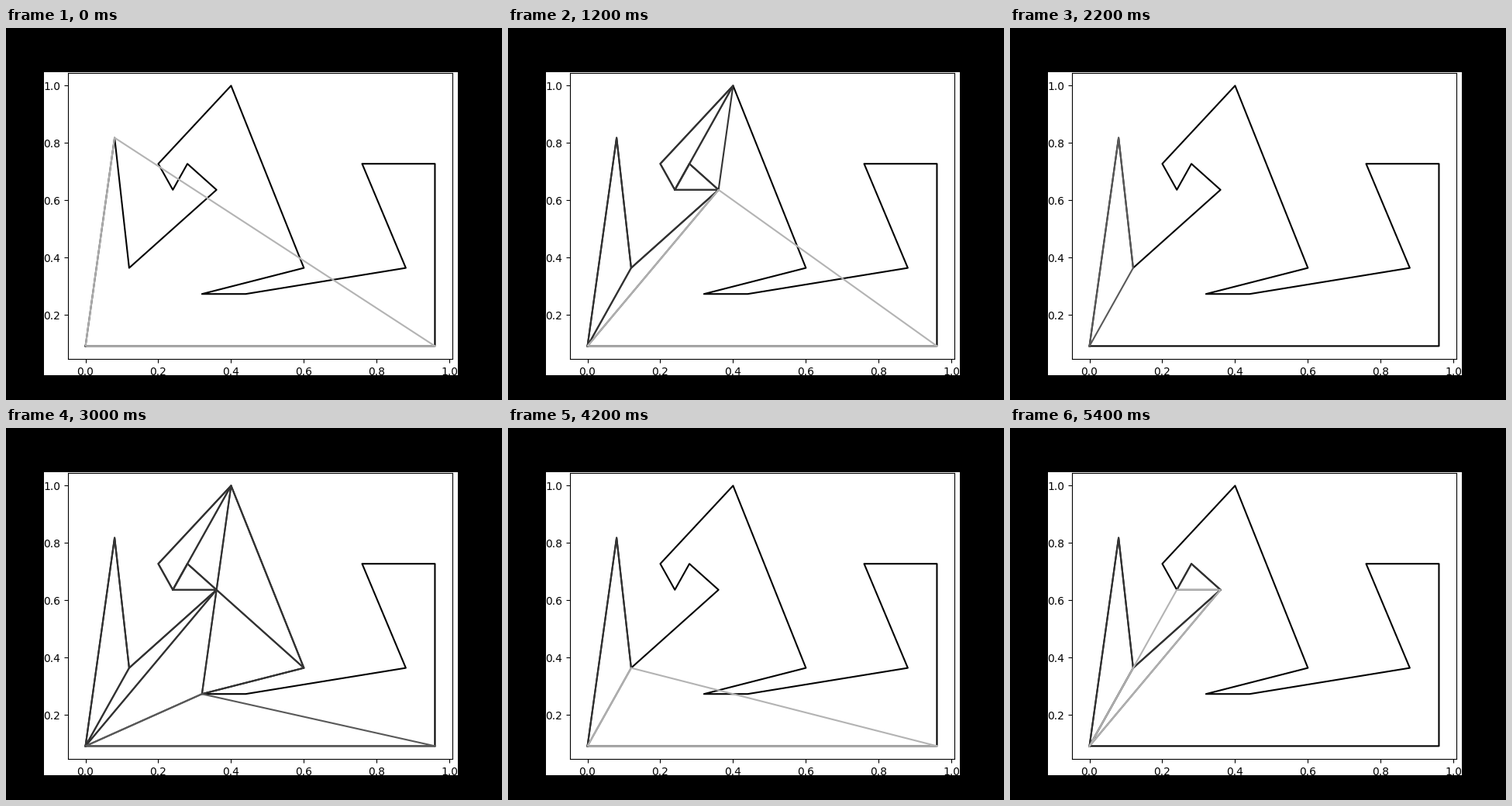
A matplotlib script for the animation above (5600 ms loop, 640 by 480 pixels).

```python
import matplotlib.pyplot as plt
from matplotlib.animation import FuncAnimation
from matplotlib.patches import Rectangle

W, H, DPI = 640, 480, 100
TRIED, EAR, DONE = "0.7", "0.35", "0.2"

# Polygon corners on a 25 x 11 grid, clockwise from the lower left
NAMES = "AONMLKJIHGFEDCB"
GRID = [(0, 1), (2, 9), (3, 4), (9, 7), (7, 8), (6, 7), (5, 8), (10, 11),
        (15, 4), (8, 3), (11, 3), (22, 4), (19, 8), (24, 8), (24, 1)]
POINTS = {n: (x / 25, y / 11) for n, (x, y) in zip(NAMES, GRID)}

# Ear clipping: lower case is a rejected tip, upper case is clipped off
TESTS = "aOaNamLamkJamKamIamHaMAGFeDC"


def clip_steps():
    ring = list(NAMES)
    steps = []
    for t in TESTS:
        i = ring.index(t.upper())
        steps.append((ring[i - 1] + ring[i] + ring[(i + 1) % len(ring)], t.isupper()))
        if t.isupper():
            ring.pop(i)
    return steps


def outline(names):
    return zip(*[POINTS[n] for n in names + names[0]])


steps = clip_steps()
# Steps are shown in alphabetical order of their numbers: 1, 10, 11, ...
order = sorted(range(len(steps)), key=lambda n: str(n + 1))

fig = plt.figure(figsize=(W / DPI, H / DPI), dpi=DPI, facecolor="black")
fig.add_artist(Rectangle((49 / W, 32 / H), 534 / W, 391 / H,
                         fc="white", ec="none", antialiased=False, zorder=-1))
ax = fig.add_subplot()
ax.plot(*outline(NAMES), color="black")
lines = [ax.plot(*outline(tri), visible=False)[0] for tri, _ in steps]


def update(frame):
    now = order[frame]
    for n, (line, (_, ear)) in enumerate(zip(lines, steps)):
        line.set_visible(n == now or (n < now and ear))
        line.set_color(DONE if n < now else EAR if ear else TRIED)
    return lines


anim = FuncAnimation(fig, update, frames=len(steps), interval=200,
                     repeat=True, repeat_delay=0)
plt.show()
```
